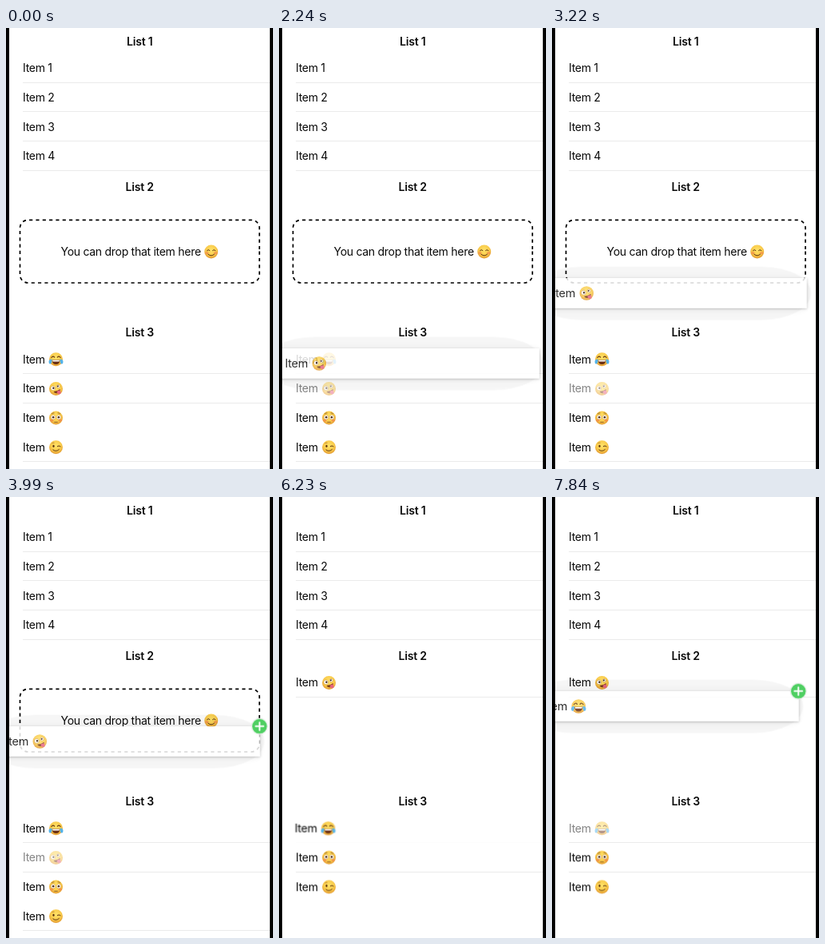
Recreate the animation shown at these times as an HTML page. Size 334x552 px, loop 8000 ms.

```html
<!DOCTYPE html>
<html lang="en">
<head>
<meta charset="utf-8">
<title>Drag and drop lists</title>
<style>
html, body { margin: 0; width: 100%; height: 100%; overflow: hidden; background: #fff; }
svg { display: block; width: 100%; height: 100%; }
text { font: 14px Inter, Roboto, sans-serif; letter-spacing: -.28px; fill: #0a0a0a; }
.title { font-weight: 600; letter-spacing: -.22px; text-anchor: middle; }
.line { stroke: #ebebeb; }

/* every part shares one 8 s clock */
.drag, .card, .shadow, .badge, .hint, .added, .row {
  animation: 8s linear infinite;
}
.zany.drag { animation-name: zany-path; }
.zany .card { animation-name: zany-card; }
.zany .shadow { animation-name: zany-shadow; }
.zany .badge { animation-name: zany-badge; }
.joy.drag { animation-name: joy-path; }
.joy .card { animation-name: joy-card; }
.joy .shadow { animation-name: joy-shadow; }
.joy .badge { animation-name: joy-badge; }
.hint { animation-name: hint; }
.added { animation-name: added; }
.row.first { animation-name: first-row; }
.row.taken { animation-name: taken-row; }
.row.below { animation-name: close-gap; }

@keyframes zany-path {
  0%, 14.875% { transform: translate(4px, 433px) scale(1); }
  20%, 26.25% { transform: translate(-1px, 432.3px) scale(1.03); }
  28% { transform: translate(-10px, 401px) scale(1.03); }
  32.5% { transform: translate(-13px, 361px) scale(1.03); }
  36.25% { transform: translate(-15.5px, 335px) scale(1.03); }
  40.25% { transform: translate(-17px, 313px) scale(1.03); }
  46.375% { transform: translate(-18px, 291px) scale(1.03); }
  49.875% { transform: translate(-18px, 287px) scale(1.03); }
  55.125% { transform: translate(-18px, 287px) scale(1.03); animation-timing-function: ease-out; }
  60%, 100% { transform: translate(4px, 214px) scale(1); }
}
@keyframes zany-card {
  0%, 14.87% { opacity: 0; }
  14.875%, 26.25% { opacity: 1; }
  28%, 55.125% { opacity: .84; }
  60%, 61.25% { opacity: 1; }
  61.26%, 100% { opacity: 0; }
}
@keyframes zany-shadow {
  0%, 26.25% { opacity: 0; }
  28%, 55.125% { opacity: 1; }
  59%, 100% { opacity: 0; }
}
@keyframes zany-badge {
  0%, 47.25% { opacity: 0; transform: scale(.3); }
  49%, 55.125% { opacity: 1; transform: scale(1); }
  56.5%, 100% { opacity: 0; transform: scale(.3); }
}
@keyframes joy-path {
  0%, 76.125% { transform: translate(4px, 396.3px) scale(1); }
  82%, 88.375% { transform: translate(-1px, 395.7px) scale(1.03); }
  89.25% { transform: translate(-1px, 387px) scale(1.03); }
  91% { transform: translate(-5px, 361px) scale(1.03); }
  93.625% { transform: translate(-13px, 311px) scale(1.03); }
  96% { transform: translate(-22px, 264px) scale(1.03); }
  98%, 100% { transform: translate(-27px, 243px) scale(1.03); }
}
@keyframes joy-card {
  0%, 76.12% { opacity: 0; }
  76.125%, 88.375% { opacity: 1; }
  89.25%, 100% { opacity: .86; }
}
@keyframes joy-shadow {
  0%, 88.375% { opacity: 0; }
  89.25%, 100% { opacity: 1; }
}
@keyframes joy-badge {
  0%, 95% { opacity: 0; transform: scale(.3); }
  97%, 100% { opacity: 1; transform: scale(1); }
}
@keyframes hint {
  0%, 55.125% { opacity: 1; }
  57.5%, 100% { opacity: 0; }
}
@keyframes added {
  0%, 59.5% { opacity: 0; }
  61.25%, 100% { opacity: 1; }
}
@keyframes first-row {
  0%, 88.375% { opacity: 1; }
  89.25%, 100% { opacity: .5; }
}
@keyframes taken-row {
  0%, 26.25% { opacity: 1; }
  27.1%, 55.125% { opacity: .5; }
  57.5%, 100% { opacity: 0; }
}
@keyframes close-gap {
  0%, 56% { transform: translateY(0); animation-timing-function: ease-in-out; }
  61.25%, 100% { transform: translateY(-36.7px); }
}
</style>
</head>
<body>
<svg viewBox="0 0 334 552" preserveAspectRatio="none">
  <defs>
    <radialGradient id="skin" cy=".38" r=".64">
      <stop stop-color="#ffe36a"/>
      <stop offset=".6" stop-color="#f9cb4b"/>
      <stop offset="1" stop-color="#e0942f"/>
    </radialGradient>
    <filter id="soft" x="-20%" y="-100%" width="140%" height="300%"><feGaussianBlur stdDeviation="6"/></filter>
    <filter id="tight" x="-5%" y="-30%" width="110%" height="160%"><feGaussianBlur stdDeviation="1.4"/></filter>
    <circle id="face" r="8.5" fill="url(#skin)"/>

    <g id="joy" stroke-linecap="round">
      <use href="#face"/>
      <path d="M-5.6-2.2q1.8-2.6 3.8-.4M1.8-2.6q2-2.2 3.8.4" fill="none" stroke="#6b3d12" stroke-width="1.2"/>
      <path d="M-5 .8H5Q4.6 6.4 0 6.4T-5 .8Z" fill="#6a2f14"/>
      <path d="M-4.5 1H4.5L4 2.8H-4Z" fill="#fff"/>
      <path id="tear" d="M-5.2-.3Q-9-.2-9 3t2.1 2.7Q-4.7 5-5.2-.3Z" fill="#54b3ea"/>
      <use href="#tear" transform="scale(-1 1)"/>
    </g>

    <g id="zany">
      <use href="#face"/>
      <g transform="rotate(-20)">
        <circle cx="-3.3" cy="-1.8" r="2.8" fill="#fff" stroke="#c98a2b" stroke-width=".5"/>
        <circle cx="-2.7" cy="-1.7" r="1.2" fill="#402411"/>
        <circle cx="3.6" cy="-1.7" r="2.1" fill="#fff" stroke="#c98a2b" stroke-width=".5"/>
        <circle cx="3.3" cy="-2" r="1" fill="#402411"/>
        <path d="M-4.2 2.4Q0 4 4.6 2.4Q4 6 .3 6T-4.2 2.4Z" fill="#7a3a18"/>
        <path d="M-.6 4Q2 2.8 4 3.8L4.2 6.6Q3.4 8.4 1.5 8T-.6 4Z" fill="#e8647f"/>
      </g>
    </g>

    <g id="flushed">
      <use href="#face"/>
      <g fill="#f27a4d" opacity=".6">
        <ellipse cx="-5.3" cy="3" rx="2.3" ry="1.7"/><ellipse cx="5.3" cy="3" rx="2.3" ry="1.7"/>
      </g>
      <g fill="#fff" stroke="#c98a2b" stroke-width=".5">
        <circle cx="-3.5" cy="-.9" r="2.8"/><circle cx="3.5" cy="-.9" r="2.8"/>
      </g>
      <g fill="#4a2a14"><circle cx="-3.4" cy="-.8" r="1.3"/><circle cx="3.4" cy="-.8" r="1.3"/></g>
      <path d="M-5.3-5.2q1.3-1.2 2.8-1M5.3-5.2q-1.3-1.2-2.8-1M-1.8 5.2H1.8" fill="none" stroke="#8a5722" stroke-width=".9" stroke-linecap="round"/>
    </g>

    <g id="wink" stroke-linecap="round">
      <use href="#face"/>
      <ellipse cx="-3" cy="-1.5" rx="1.1" ry="1.6" fill="#5a3212"/>
      <path d="M1.8-1.2q1.9-1.5 3.8.2M-3.6 3.2Q0 6.2 3.8 2.8" fill="none" stroke="#5a3212"/>
      <path d="M-4.9-5q1.2-1 2.5-.6" fill="none" stroke="#a56a28" stroke-width=".7"/>
    </g>

    <g id="smile" stroke-linecap="round">
      <use href="#face"/>
      <g fill="#f27a4d" opacity=".55">
        <ellipse cx="-5.4" cy="1.6" rx="2.2" ry="1.6"/><ellipse cx="5.4" cy="1.6" rx="2.2" ry="1.6"/>
      </g>
      <path d="M-5.2-1.4q1.7-2.2 3.4-.1M1.8-1.5q1.7-2.1 3.4.1M-3.8 3.2Q0 6.6 3.8 3.2" fill="none" stroke="#5a3212"/>
    </g>

    <g id="halo">
      <rect x="-8" y="-14" width="339" height="65" rx="60" ry="32" opacity=".045"/>
      <rect y="2" width="324" height="35" opacity=".1" filter="url(#soft)"/>
      <rect y="1" width="326" height="36.4" opacity=".27" filter="url(#tight)"/>
    </g>
    <rect id="sheet" width="326" height="36.7" fill="#fff"/>
    <g id="plus">
      <circle r="10" fill="#fff" stroke="#000" stroke-opacity=".12" stroke-width=".6"/>
      <circle r="9" fill="#4fcf62"/>
      <path d="M-4.8 0H4.8M0-4.8V4.8" stroke="#fff" stroke-width="1.9" stroke-linecap="round"/>
    </g>
  </defs>

  <rect width="334" height="552" fill="#fff"/>

  <path class="line" d="M21 68.500H330M21 104.500H330M21 141.500H330M21 178.500H330M21 432.500H330M21 469.500H330"/>

  <text class="title" x="167.200" y="21.500">List 1</text>
  <text x="21" y="55.300">Item 1</text>
  <text x="21" y="92">Item 2</text>
  <text x="21" y="128.600">Item 3</text>
  <text x="21" y="165.300">Item 4</text>

  <text class="title" x="167.200" y="204">List 2</text>
  <g class="hint">
    <!-- the dashes run clockwise from the middle of the right side -->
    <path d="M317 279.600v29.400a10 10 0 0 1-10 10h-279.500a10 10 0 0 1-10-10v-58.700a10 10 0 0 1 10-10h279.500a10 10 0 0 1 10 10z" fill="none" stroke="#000" stroke-width="1.700" stroke-dasharray="4.160"/>
    <text x="68.500" y="285">You can drop that item here</text>
    <use href="#smile" x="256.700" y="280"/>
    <path class="line" d="M21 542.500H330"/>
  </g>
  <g class="added">
    <path class="line" d="M21 250.500H330"/>
    <text x="21" y="237.400">Item</text>
    <use href="#zany" x="62.500" y="232.400"/>
  </g>

  <text class="title" x="167.200" y="386">List 3</text>
  <g class="row first">
    <text x="21" y="419.700">Item</text>
    <use href="#joy" x="62.500" y="414.700"/>
  </g>
  <g class="row taken">
    <text x="21" y="456.400">Item</text>
    <use href="#zany" x="62.500" y="451.400"/>
  </g>
  <g class="row below">
    <text x="21" y="493.100">Item</text>
    <use href="#flushed" x="62.500" y="488.100"/>
    <text x="21" y="529.800">Item</text>
    <use href="#wink" x="62.500" y="524.800"/>
  </g>

  <g class="drag zany">
    <g class="card">
      <use class="shadow" href="#halo"/>
      <use href="#sheet"/>
      <text x="17" y="23.400">Item</text>
      <use href="#zany" x="58.500" y="18.400"/>
    </g>
    <g transform="translate(325.400 0)"><g class="badge"><use href="#plus"/></g></g>
  </g>

  <g class="drag joy">
    <g class="card">
      <use class="shadow" href="#halo"/>
      <use href="#sheet"/>
      <text x="17" y="23.400">Item</text>
      <use href="#joy" x="58.500" y="18.400"/>
    </g>
    <g transform="translate(325.400 0)"><g class="badge"><use href="#plus"/></g></g>
  </g>

  <path d="M0 0H4V552H0ZM330 0H334V552H330Z"/>
</svg>
</body>
</html>
```
